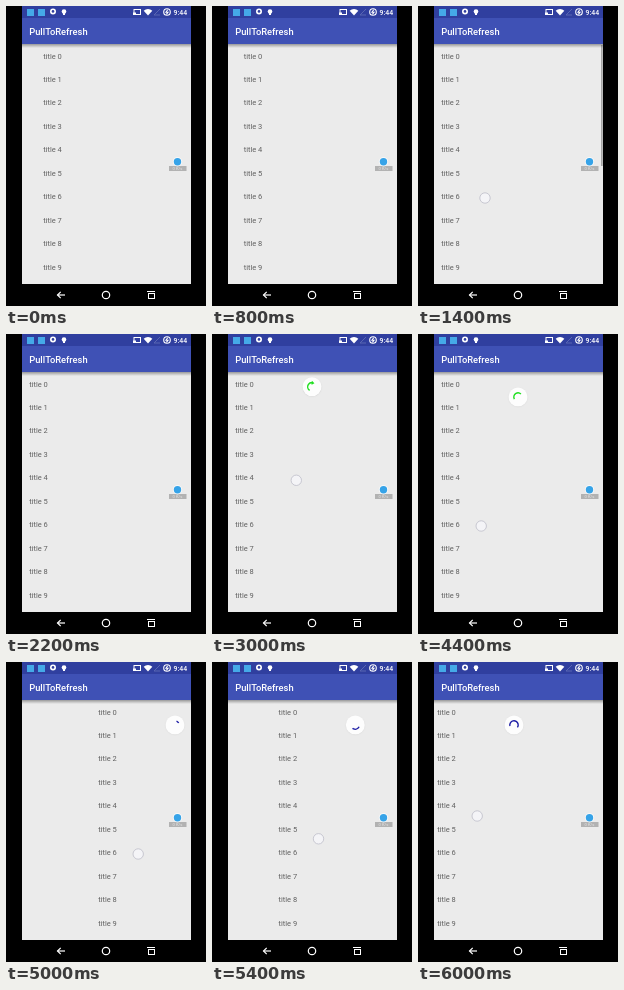
Recreate the animation shown at these times as an HTML page with a canvas. Size 200 by 300 pixels, loop 6.2 s.

```html
<!DOCTYPE html>
<html lang="en">
<head>
<meta charset="utf-8">
<title>Pull to refresh</title>
<style>
html, body { margin: 0; width: 100%; height: 100%; overflow: hidden; background: #000; }
canvas { display: block; width: 200px; height: 300px; }
</style>
</head>
<body>
<canvas id="stage"></canvas>
<script>
const LOOP = 6200, STEP = 200, TAU = Math.PI * 2;
const PULL = 2600, RELEASE = 4000, SWIPE = 4400, TURN = 5000, END = 6000;
const FONT = 'Roboto, "Open Sans", sans-serif';
const GREEN = '#20df20', NAVY = '#1c1ca4';
const canvas = document.getElementById('stage');
const ctx = canvas.getContext('2d');
const ratio = window.devicePixelRatio || 1;
canvas.width = 200 * ratio;
canvas.height = 300 * ratio;

// Progress from 0 to 1 between two times
const part = (t, from, to) => Math.min(1, Math.max(0, (t - from) / (to - from)));
const smooth = u => u * u * (3 - 2 * u);
const easeOut = u => 1 - (1 - u) ** 2.5;

function slideAt(t) {
  return 14 * (1 - part(t, 0, 1000) ** 4.2)
    + 69 * easeOut(part(t, SWIPE, TURN))
    - 73 * smooth(part(t, TURN, END));
}

const scrollAt = t => 24 * Math.sin(Math.PI * part(t, 1400, 1800));

function spinnerY(t) {
  const top = 34 + 43.3 * Math.sin(part(t, PULL, RELEASE) * Math.PI / 2);
  return top + (63 - top) * easeOut(part(t, RELEASE, SWIPE));
}

function touchAt(t) {
  if (t >= 1000 && t <= 1800) return [67, 192 - scrollAt(t)];
  if (t >= PULL && t <= RELEASE) {
    const u = part(t, PULL, RELEASE);
    return [78 + 22 * u, 110 + 127 * u];
  }
  if (t >= SWIPE) return [63.2 + slideAt(t), 192 - 38 * part(t, TURN, END)];
  return null;
}

function rect(x, y, w, h, color) {
  ctx.fillStyle = color;
  ctx.fillRect(x, y, w, h);
}

function frame(x, y, w, h, color) {
  ctx.strokeStyle = color;
  ctx.lineWidth = 1;
  ctx.strokeRect(x, y, w, h);
}

function disc(x, y, r, color) {
  ctx.fillStyle = color;
  ctx.beginPath();
  ctx.arc(x, y, r, 0, TAU);
  ctx.fill();
}

function arc(x, y, r, from, to, color, width) {
  ctx.strokeStyle = color;
  ctx.lineWidth = width;
  ctx.beginPath();
  ctx.arc(x, y, r, from, to);
  ctx.stroke();
}

function wedge(x, y, r, from, to, color) {
  ctx.fillStyle = color;
  ctx.beginPath();
  ctx.moveTo(x, y);
  ctx.arc(x, y, r, from, to);
  ctx.fill();
}

function line(color, width, ...points) {
  ctx.strokeStyle = color;
  ctx.lineWidth = width;
  ctx.beginPath();
  points.forEach(([x, y]) => ctx.lineTo(x, y));
  ctx.stroke();
}

function label(text, x, y, size, color, weight = 400) {
  ctx.font = `${weight} ${size}px ${FONT}`;
  ctx.fillStyle = color;
  ctx.fillText(text, x, y);
}

function drawList(t) {
  const x = 23.2 + slideAt(t), scroll = scrollAt(t);
  for (let i = 0; i < 20; i++) {
    label('title ' + i, x, 52.5 + i * 23.45 - scroll, 7.5, '#606060');
  }
  if (t >= 1000 && t < 2000) rect(183, 39 + scroll / 2, 1.7, 121, '#a6a6a6');
}

function drawSpinner(t) {
  if (t < PULL) return;
  const x = 100 + slideAt(t), y = spinnerY(t);
  ctx.save();
  ctx.shadowColor = 'rgba(0,0,0,.1)';
  ctx.shadowBlur = ratio;
  ctx.shadowOffsetY = 0.4 * ratio;
  disc(x, y, 9.5, '#fdfdfd');
  ctx.restore();
  if (t <= RELEASE) {
    const start = (y - 73) * 0.08 - 2.5;
    const end = start + 5 * part(y, 30, 73);
    arc(x, y, 4.3, start, end, GREEN, 1.5);
    wedge(x + 4.3 * Math.cos(end + 0.5), y + 4.3 * Math.sin(end + 0.5), 3.2, end - 2.2, end - 0.9, GREEN);
  } else {
    const phase = (t - TURN) / 1000;
    const start = 4.1 * phase - 1.2;
    const sweep = 0.7 + 3.3 * Math.sin(phase * Math.PI / 2) ** 2;
    arc(x, y, 4.2, start, start + sweep, t < 4600 ? GREEN : NAVY, 1.4);
  }
}

function drawTouch(t) {
  const spot = touchAt(t);
  if (!spot) return;
  disc(...spot, 5.2, 'rgba(245,245,248,.9)');
  arc(...spot, 5.2, 0, TAU, '#bdbdc8', 0.8);
}

function drawStatus() {
  for (const x of [21, 32]) rect(x, 3, 7, 7, '#45a9e8');
  disc(47, 5.6, 3, '#fff');
  disc(47, 5.4, 1.3, '#303f9f');
  disc(58, 5.5, 2.3, '#fff');
  rect(57, 7, 2, 2, '#fff');

  frame(128, 3.5, 6.5, 5, '#fff');
  rect(127, 6.5, 3, 2.5, '#fff');
  wedge(142, 9.5, 6.5, -2.3, -0.84, '#fff');
  line('#5966b2', 1, [154, 3], [148, 9], [154, 9]);
  arc(161, 6, 3.3, 0, TAU, '#fff', 1.1);
  line('#fff', 1.1, [161.7, 3.8], [160, 6.2], [162, 6.2], [160.4, 8.4]);
  label('9:44', 167.5, 9, 6.9, '#fff', 500);
}

function drawBars() {
  const shade = ctx.createLinearGradient(0, 37.5, 0, 42);
  shade.addColorStop(0, 'rgba(0,0,0,.4)');
  shade.addColorStop(0.6, 'rgba(0,0,0,.15)');
  shade.addColorStop(1, 'rgba(0,0,0,0)');
  rect(16, 38, 169, 4, shade);
  rect(16, 0, 169, 12, '#303f9f');
  rect(16, 12, 169, 26, '#3f51b5');
  label('PullToRefresh', 23.2, 28.7, 9.35, '#fff', 500);
  drawStatus();
}

function drawWidget() {
  rect(163, 160, 17.5, 5, '#b2b2b2');
  label('0 K/s', 166.5, 164.2, 4.2, '#e6e6e6');
  disc(171.5, 155.7, 4.7, '#f8f8f8');
  disc(171.5, 155.7, 3.7, '#36a3e8');
}

function drawNav() {
  rect(16, 278, 169, 22, '#000');
  line('#fff', 1.2, [51.5, 289], [59, 289]);
  line('#fff', 1.2, [54.7, 285.8], [51.5, 289], [54.7, 292.2]);
  arc(100, 289, 3.7, 0, TAU, '#fff', 1.2);
  frame(142.5, 287.5, 6, 5, '#fff');
  rect(141, 285, 8, 1, '#fff');
}

function draw(t) {
  ctx.setTransform(ratio, 0, 0, ratio, 0, 0);
  rect(0, 0, 200, 300, '#000');
  ctx.save();
  ctx.beginPath();
  ctx.rect(16, 38, 169, 240);
  ctx.clip();
  rect(16, 38, 169, 240, '#ebebeb');
  drawList(t);
  drawSpinner(t);
  ctx.restore();
  drawBars();
  drawWidget();
  drawNav();
  drawTouch(t);
}

const begin = performance.now();
function tick() {
  const t = (performance.now() - begin) % LOOP;
  draw(Math.floor(t / STEP) * STEP);
  requestAnimationFrame(tick);
}
tick();
</script>
</body>
</html>
```
